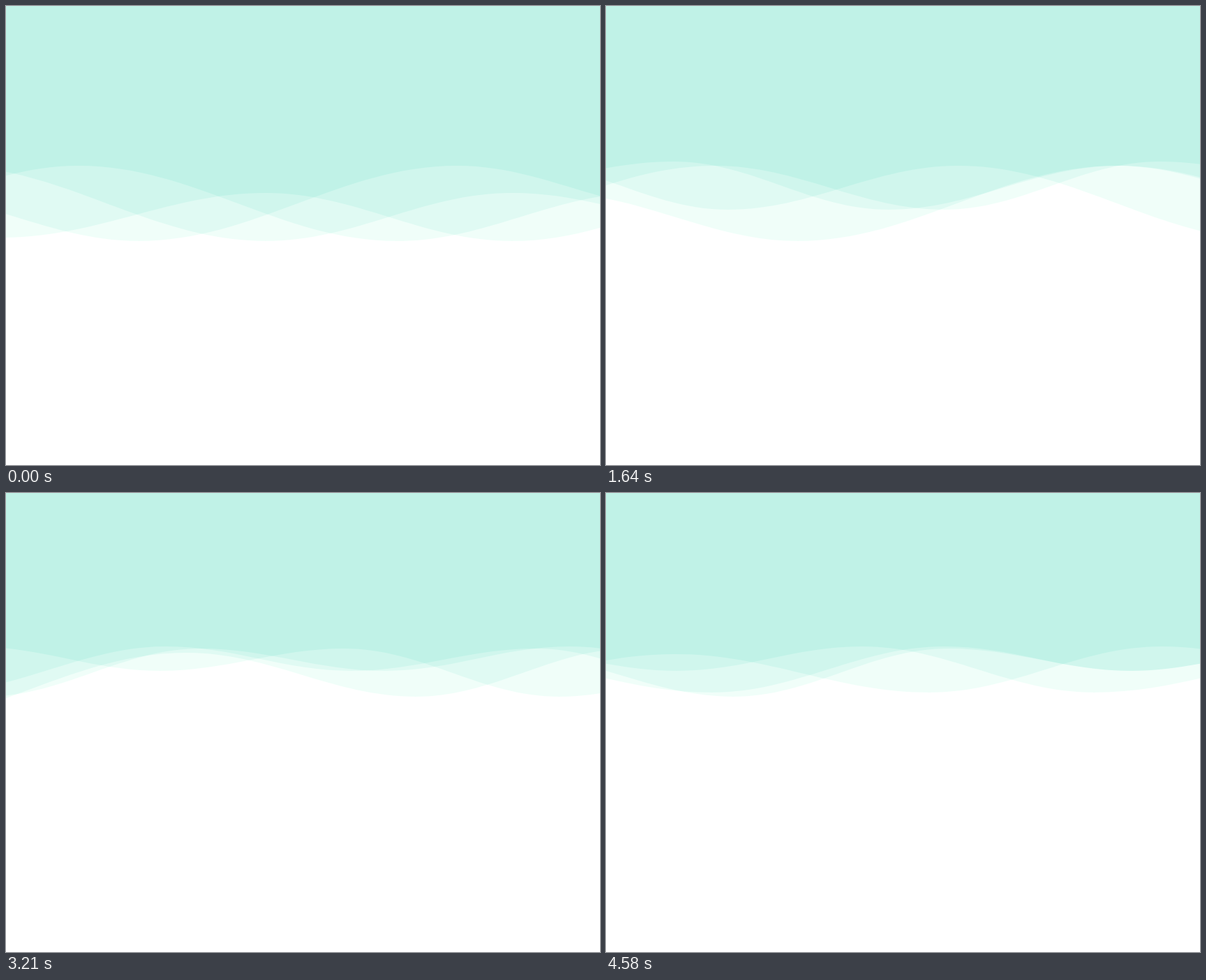
These frames come from a looping animation (851 px wide and 658 px high, 4660 ms). An HTML page with a canvas:

```html
<!DOCTYPE html>
<html lang="en">
<head>
<meta charset="utf-8">
<title>Waves</title>
<style>
  html, body { margin: 0; width: 100%; height: 100%; overflow: hidden; background: #fff; }
  canvas { display: block; }
</style>
</head>
<body>
<canvas id="stage" width="851" height="658"></canvas>
<script>
const W = 851, H = 658, LOOP = 4660, TICK = 1000 / 14, LAST_TICK = 64;
const ctx = document.getElementById('stage').getContext('2d');

// One swell, shared by all waves: its crests and troughs in turn
const swell = smoothPath([
  [-730, 332], [-353, 268], [0, 337], [456, 229], [785, 292], [1093, 223],
  [1357, 255], [1622, 220], [1955, 286], [2320, 231], [2690, 286]
]);

// Those that run to the right show the swell mirrored
const waves = [
  { start: 560, speed: 31.5 },
  { start: 372, speed: 29.4 },
  { start: 190, speed: -24.5 },
  { start: 725, speed: -22.5 }
];

// Joins the points with level tangents and closes the shape below the stage
function smoothPath(points) {
  const path = new Path2D();
  let [x0, y0] = points[0];
  path.moveTo(x0, H);
  path.lineTo(x0, y0);
  for (const [x, y] of points.slice(1)) {
    const reach = (x - x0) * 0.364;
    path.bezierCurveTo(x0 + reach, y0, x - reach, y, x, y);
    [x0, y0] = [x, y];
  }
  path.lineTo(x0, H);
  return path;
}

// Rests at the start, then skips one tick in twenty
function stepAt(time) {
  const tick = Math.min(LAST_TICK, Math.floor((time + 5) / TICK));
  return Math.max(0, tick - 2 - Math.floor((tick + 9) / 20));
}

function frame() {
  const step = stepAt(performance.now() % LOOP);
  ctx.resetTransform();
  ctx.globalCompositeOperation = 'source-over';
  ctx.fillStyle = '#c0f2e7';
  ctx.fillRect(0, 0, W, H);

  // Each wave lightens what it covers; all four together give white
  ctx.globalCompositeOperation = 'lighter';
  ctx.fillStyle = 'rgb(16, 4, 6)';
  for (const { start, speed } of waves) {
    ctx.setTransform(-Math.sign(speed), 0, 0, 1, start + speed * step, 0);
    ctx.fill(swell);
  }
  requestAnimationFrame(frame);
}
frame();
</script>
</body>
</html>
```
